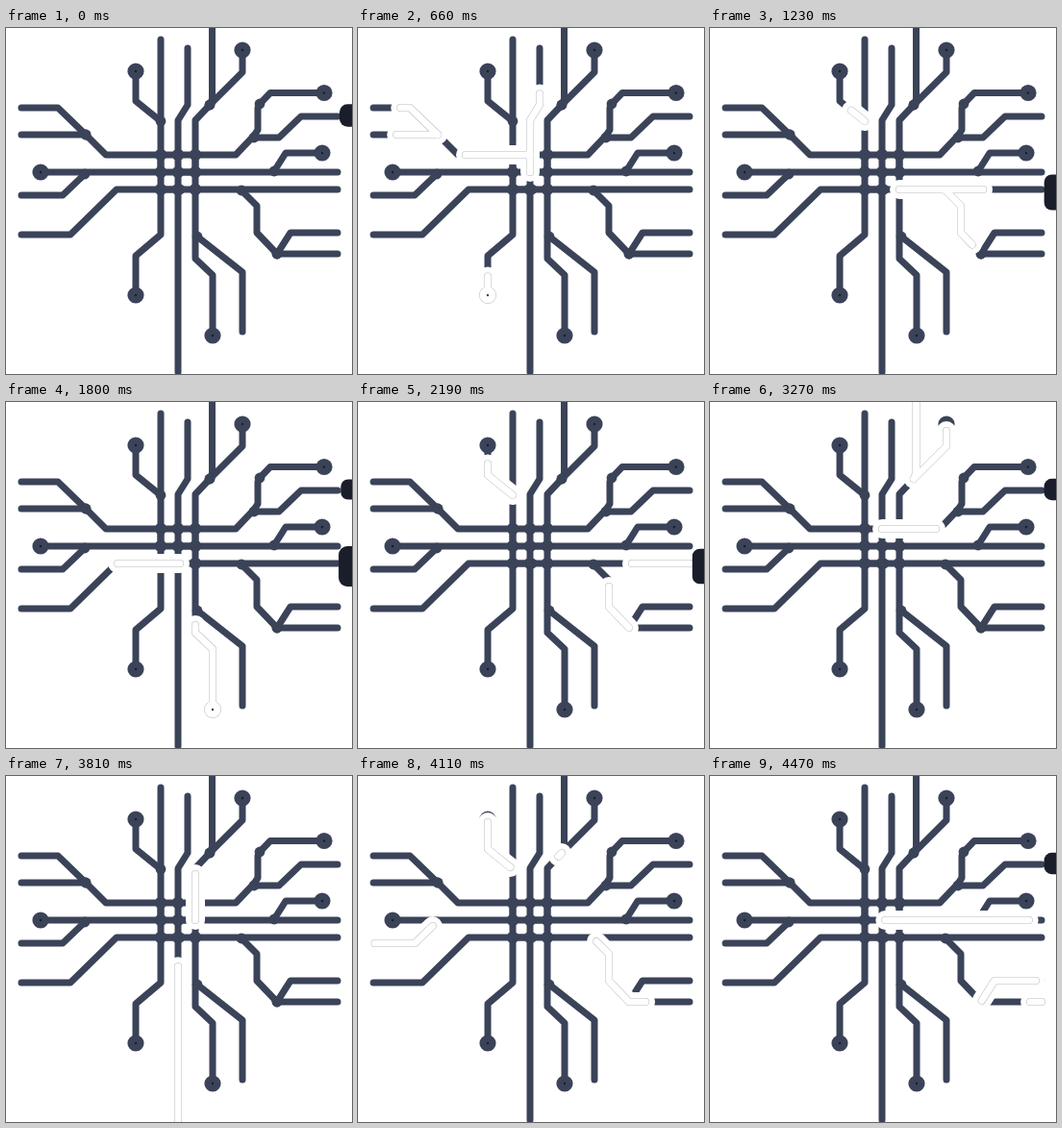
Recreate the animation shown at these times as an HTML page with a canvas. Size 360x360 px, loop 4.5 s.

```html
<!DOCTYPE html>
<html lang="en">
<head>
<meta charset="utf-8">
<title>Circuit pulses</title>
<style>
html, body { margin: 0; width: 100%; height: 100%; overflow: hidden; background: #fff; }
canvas { display: block; width: 100vmin; height: 100vmin; }
svg { position: absolute; width: 0; height: 0; }
</style>
</head>
<body>
<canvas id="stage"></canvas>
<svg><path id="probe"/></svg>
<script>
const LOOP = 4500, STEP = 30, GROW = 250, LAG = 0.9, TRAVEL = GROW * (1 + LAG);
const INK = '#3b4359', SPOT = '#1a1e2b';

const canvas = document.getElementById('stage');
const probe = document.getElementById('probe');
const ctx = canvas.getContext('2d');
const ratio = window.devicePixelRatio || 1;
canvas.width = canvas.height = 360 * ratio;
ctx.scale(ratio, ratio);
ctx.lineCap = ctx.lineJoin = 'round';

// Traces run outward from the centre; some end in a round pad.
function trace(d, hasPad) {
  probe.setAttribute('d', d);
  const length = probe.getTotalLength();
  return { path: new Path2D(d), length, hasPad,
    from: probe.getPointAtLength(0), end: probe.getPointAtLength(length) };
}
const padded = d => trace(d, true);

// Traces that light up together, by start time
const bursts = [
  [225, padded('M161 168V215L135 237V278')],
  [500, trace('M179 132H104L83 111'), trace('M83 111L54 83H16'),
        trace('M83 111H16'), trace('M179 150V96L189 80V21')],
  [1475, padded('M197 168V240L215 257V320')],
  [1712, trace('M181 168H115L67 215H16')],
  [2365, trace('M161 150V12'), padded('M264 79L275 67.5H331')],
  [3045, trace('M212 80L214.5 74V-12'), padded('M212 80L246 46V23')],
  [3110, trace('M179 132H239L258 112')],
  [3527, trace('M179 150V358')],
  [3652, trace('M197 150V96L212 80')],
  [4042, trace('M282 235H345')],
  [4240, trace('M179 150H345'), trace('M282 235L296 213H345')]
];

// Traces that light up at random between the bursts
const idle = [
  padded('M161 150H36'), trace('M82 152L59 174H16'), padded('M161 97L135 76V45'),
  trace('M258 114H284L307 92H345'), padded('M279 149L291 130H329'),
  trace('M197 168H345'), trace('M245 169L261 185V213L282 235'),
  trace('M199 217L246 254V316')
];

const links = ['M161 132V168H197V132', 'M161 150H197', 'M258 112L262 106V83L264 79']
  .map(d => new Path2D(d));

let seed = 7;
const random = () => (seed = seed * 16807 % 2147483647) / 2147483647;

const pulses = bursts.flatMap(([start, ...group]) =>
  group.map(line => ({ line, start })));
const beats = [0, 660, 1800, 2580, 3270, 3810, 4470];
beats.slice(1).forEach((to, i) => {
  const room = to - beats[i] - TRAVEL;
  for (let n = 0; n < 3; n++) {
    const line = idle[Math.floor(random() * idle.length)];
    pulses.push({ line, start: beats[i] + random() * room });
  }
});

const lines = [...new Set([...bursts.flatMap(b => b.slice(1)), ...idle])];

function disc({ x, y }, r, color) {
  ctx.fillStyle = color;
  ctx.beginPath();
  ctx.arc(x, y, r, 0, 2 * Math.PI);
  ctx.fill();
}

function drawBoard() {
  ctx.setLineDash([]);
  ctx.strokeStyle = INK;
  ctx.lineWidth = 7;
  for (const path of [...lines.map(l => l.path), ...links]) ctx.stroke(path);
  for (let x = 161; x < 200; x += 18)
    for (let y = 132; y < 170; y += 18) disc({ x, y }, 6.2, INK);
  for (const { from, end, hasPad } of lines) {
    disc(from, 5.4, INK);
    if (!hasPad) continue;
    disc(end, 8.6, INK);
    disc(end, 1.2, SPOT);
  }
}

function drawPulse({ line, head, tail }, width, color, padRadius) {
  const { path, length, end, hasPad } = line;
  ctx.strokeStyle = color;
  ctx.lineWidth = width;
  ctx.setLineDash([Math.max((head - tail) * length, 0.1), 2 * length]);
  ctx.lineDashOffset = -tail * length;
  ctx.stroke(path);
  if (hasPad && head === 1) disc(end, padRadius, color);
}

// Dark spot that swells at the right edge
function drawSpot(time, y, height, peak, period) {
  const wave = Math.cos(2 * Math.PI * (time - peak) / period);
  const size = Math.max(0, (wave - 0.4) / 0.6) ** 0.3;
  if (!size) return;
  ctx.fillStyle = SPOT;
  ctx.beginPath();
  ctx.roundRect(360 - 14 * size, y - height * size / 2, 28, height * size, 9 * size);
  ctx.fill();
}

function draw(time) {
  ctx.fillStyle = '#fff';
  ctx.fillRect(0, 0, 360, 360);
  drawBoard();

  const active = pulses.map(({ line, start }) => {
    const phase = (time - start) / GROW;
    return { line, phase, head: Math.min(phase, 1), tail: Math.max(phase - LAG, 0) };
  }).filter(p => p.phase > 0 && p.tail < 1);

  for (const p of active) drawPulse(p, 20, '#fff', 11);
  for (const p of active) drawPulse(p, 8, '#b8bac0', 9);
  for (const p of active) drawPulse(p, 7, '#fff', 8.5);
  for (const { line, head } of active)
    if (line.hasPad && head === 1) disc(line.end, 1.2, INK);

  drawSpot(time, 91, 25, 120, LOOP / 3);
  drawSpot(time, 171, 42, 1700, LOOP);
}

function tick() {
  draw(Math.floor((performance.now() % LOOP) / STEP) * STEP);
  requestAnimationFrame(tick);
}
tick();
</script>
</body>
</html>
```
